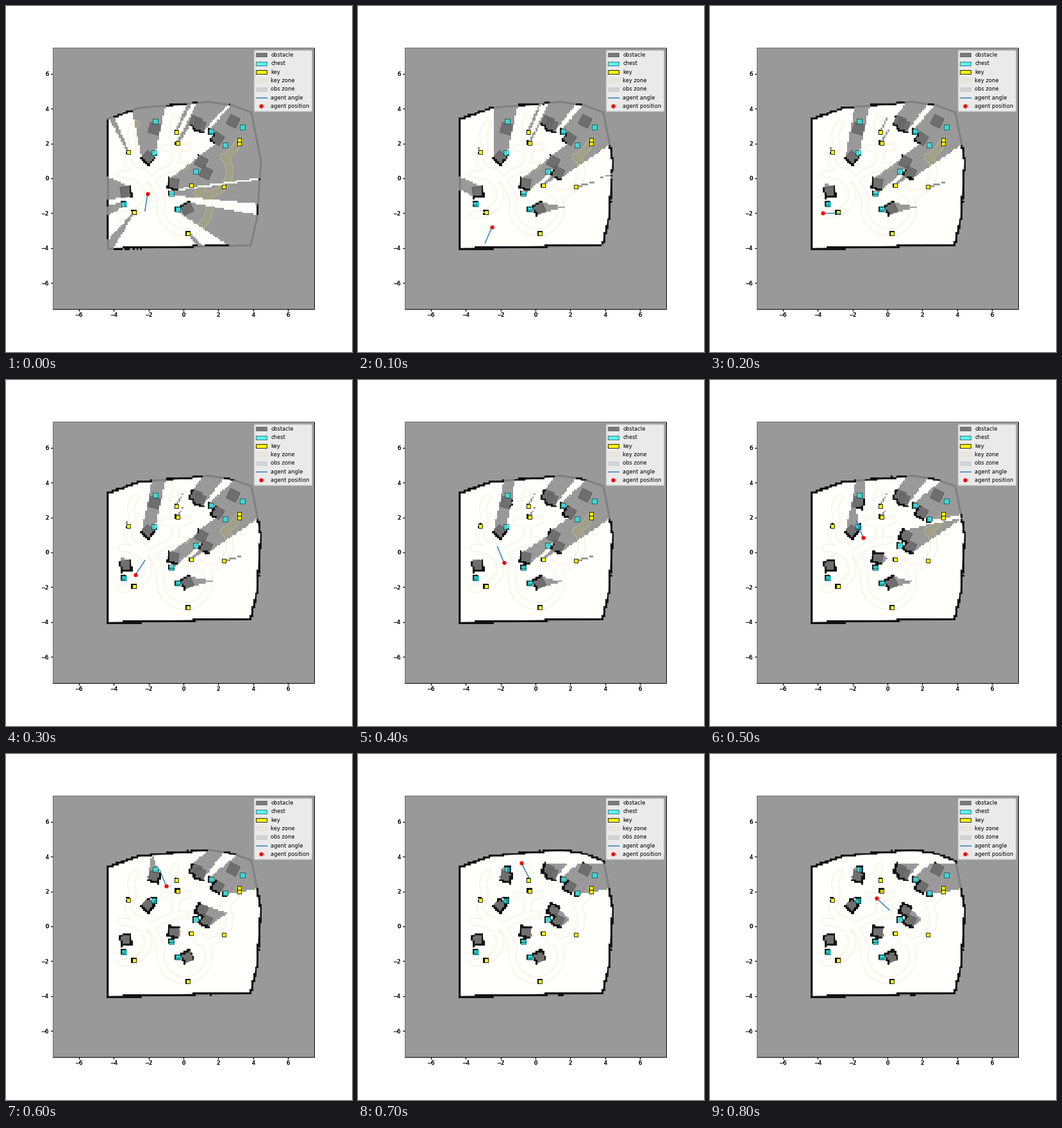
A matplotlib script that plays this animation: 540x540 px, repeating every 1100 ms.

```python
import numpy as np
import matplotlib.pyplot as plt
from matplotlib.animation import FuncAnimation
from matplotlib.lines import Line2D
from matplotlib.patches import Patch, Polygon
from matplotlib.path import Path

SIZE, DPI = 540, 100
LIM, CELL, FINE = 7.5, 0.1, 0.025
SCALE = 27.2                      # stage pixels per map unit
CX, CY = 277, 269                 # stage pixel of the map origin
BOX = [73 / SIZE, (SIZE - 473) / SIZE, 408 / SIZE, 408 / SIZE]
STEPS, LAST, SCANS = 11, 8, 4     # frames, last moving frame, scans per frame
FREE, HIT = (1, 1, 0.988), (0.07, 0.07, 0.07)


def to_map(points):
    p = np.asarray(points, float)
    return np.stack([(p[..., 0] - CX) / SCALE, (CY - p[..., 1]) / SCALE], -1)


def square(x, y, side, turn=0):
    """Corners of a square given in stage pixels, turned clockwise."""
    a = np.radians(turn + 45 + 90 * np.arange(4))
    r = side / np.sqrt(2)
    return to_map(np.stack([x + r * np.cos(a), y + r * np.sin(a)], -1))


def shrink(shape, factor):
    middle = shape.mean(0)
    return middle + (shape - middle) * factor


def arc(x, y, rx, ry, start, end):
    a = np.radians(np.linspace(start, end, 80))
    return to_map(np.stack([x + rx * np.cos(a), y + ry * np.sin(a)], -1))


def wave(p, q, swing, turns):
    """Line from p to q that sways sideways as a sine."""
    p, q = np.array(p, float), np.array(q, float)
    t = np.linspace(0, 1, 50)[:, None]
    side = np.array([p[1] - q[1], q[0] - p[0]]) / np.hypot(*(q - p))
    return to_map(p + t * (q - p) + swing * np.sin(2 * np.pi * turns * t) * side)


wall = to_map([(159, 379), (159, 176), (208, 159), (316, 149.5), (353, 155),
               (383, 166), (398, 242), (392, 330), (382, 373.5)])
obstacles = [square(x, y, 16.5, turn) for x, y, turn in [
    (231.5, 191.5, 15), (221.5, 237, 42), (187, 290, -8), (261, 277.5, 8),
    (282.5, 316, -25), (296, 181, 20), (302, 187, 18), (305, 243.5, 27),
    (312, 260.5, 25), (354.5, 180, 26), (330, 207, 32)]]
chests = [square(x, y, 8) for x, y in [
    (233, 180), (230.5, 228.5), (183.5, 308.5), (257.5, 292.5), (267.5, 316.5),
    (295.5, 257.5), (320, 195.5), (341.5, 216.5), (368.5, 188.5)]]
keys = [square(x, y, 6) for x, y in [
    (190.5, 227.5), (265.5, 196.5), (267.5, 213.5), (363.5, 208.5),
    (363.5, 214.5), (288.5, 280), (340, 282), (200, 321.5), (283.5, 354.5)]]
trails = np.vstack([
    arc(180, 294, 42, 32, -90, 90),                # loop on the left
    wave((203, 184), (190, 237), 4, 1),
    arc(212, 237, 22, 22, 90, 180),
    wave((212, 259), (242, 303), -5, 0.5),
    arc(279, 315, 38, 38, -50, 200),               # loop at the bottom
    arc(312, 258, 37, 36, -40, 110),               # bend on the right
    wave((340, 236), (363, 212), 3, 0.5),
    wave((264, 176), (262, 250), 3, 1),            # star in the middle
    wave((247, 221), (285, 219), 3, 0.5),
    wave((280, 250), (230, 268), 4, 0.5),
])

# frame, place in stage pixels, heading in degrees
stops = np.array([
    (0, 221, 293, -99), (1, 209, 345, -113), (2, 176, 323, 0),
    (4, 228, 285, 113), (6, 250, 206, 112), (7, 255, 170, -63),
    (8, 260, 225, -43)], float)


def pose(t):
    """Map place and heading in radians at frame time t."""
    x, y, turn = (np.interp(t, stops[:, 0], c) for c in stops.T[1:])
    return to_map((x, y)), np.radians(turn)


def solid_grid():
    n = int(2 * LIM / FINE)
    c = -LIM + FINE * (np.arange(n) + 0.5)
    pts = np.stack(np.meshgrid(c, c), -1).reshape(-1, 2)
    solid = ~Path(shrink(wall, 0.993)).contains_points(pts)
    for shape in obstacles + chests + [shrink(k, 0.8) for k in keys]:
        near = np.abs(pts - shape.mean(0)).max(1) < 0.7
        solid[near] |= Path(shape).contains_points(pts[near])
    return solid.reshape(n, n)


def index(v, step):
    return np.clip((v + LIM) / step, 0, 2 * LIM / step - 1).astype(int)


def scan_maps():
    """Cells known and cells hit at each frame, summed along the path."""
    solid = solid_grid()
    n = int(round(2 * LIM / CELL))
    known, hit = np.zeros((n, n), bool), np.zeros((n, n), bool)
    ang = np.linspace(0, 2 * np.pi, 1000, endpoint=False)[:, None]
    dist = np.arange(0, 10, 0.03)
    rays = np.arange(len(ang))
    maps = []
    for k in range(LAST * SCANS + 1):
        (x0, y0), _ = pose(k / SCANS)
        x, y = x0 + dist * np.cos(ang), y0 + dist * np.sin(ang)
        first = solid[index(y, FINE), index(x, FINE)].argmax(1)
        ix, iy = index(x, CELL), index(y, CELL)
        seen = np.arange(len(dist)) <= first[:, None]
        known[iy[seen], ix[seen]] = True
        hit[iy[rays, first], ix[rays, first]] = True
        if k % SCANS == 0:
            maps.append((known.copy(), hit.copy()))
    return maps


def layer(mask, color):
    img = np.zeros(mask.shape + (4,))
    img[..., :3] = color
    img[..., 3] = mask
    return img


maps = scan_maps()
fig = plt.figure(figsize=(SIZE / DPI, SIZE / DPI), dpi=DPI, facecolor="white")
# stacked axes make the tick labels look heavy
panels = [fig.add_axes(BOX, label=str(i)) for i in range(3)]
ax = panels[-1]
for p in panels:
    p.patch.set_visible(p is ax)
    p.set(xticks=range(-6, 7, 2), yticks=range(-6, 7, 2))
    p.tick_params(axis="x", labelsize=6, length=2.5, pad=1)
    p.tick_params(axis="y", labelsize=6, length=2.5, pad=2)
    p.spines[["left", "top"]].set_color("0.4")
    p.spines[:].set_linewidth(0.6)
ax.set_facecolor("0.6")

# key zone: everything close to the trails
g = np.linspace(-5, 5, 321)
gx, gy = np.meshgrid(g, g)
near = np.full(gx.shape, 9.0)
for x, y in trails:
    near = np.minimum(near, np.hypot(gx - x, gy - y))
ax.contourf(gx, gy, near, levels=[-1, 0.2], colors=["#a1a088"], zorder=1)
ax.contour(gx, gy, near, levels=[0.2], colors=["#d8d6b4"], linewidths=0.5,
           alpha=0.6, zorder=3)

grid_style = dict(extent=(-LIM, LIM, -LIM, LIM), origin="lower",
                  interpolation="nearest", aspect="auto")
free_img = ax.imshow(layer(maps[0][0], FREE), zorder=2, **grid_style)
hit_img = ax.imshow(layer(maps[0][1], HIT), zorder=6, **grid_style)

obstacle_style = dict(facecolor=(0.41, 0.41, 0.41, 0.87),
                      edgecolor=(0.33, 0.33, 0.33, 0.8), linewidth=0.6)
chest_style = dict(facecolor=(0, 1, 1, 0.6), edgecolor=(0, 0.15, 0.15, 0.7),
                   linewidth=0.6)
key_style = dict(facecolor="yellow", edgecolor="black", linewidth=0.6)
line_style = dict(color="C0", linewidth=1)
dot_style = dict(color="red", marker="o", linestyle="none", markersize=4.6,
                 markeredgewidth=0)

ax.add_patch(Polygon(wall, fill=False, edgecolor="0.5", linewidth=2.2,
                     joinstyle="round", zorder=4))
for z, shapes, style in [(5, obstacles, obstacle_style),
                         (7, chests, chest_style), (8, keys, key_style)]:
    for s in shapes:
        ax.add_patch(Polygon(s, zorder=z, **style))

pointer, = ax.plot([], [], zorder=9, **line_style)
agent, = ax.plot([], [], zorder=10, **dot_style)
mark, = ax.plot(*keys[2].mean(0), "o", color="#ff7f0e", markersize=2,
                markeredgewidth=0, zorder=10)

ax.legend(handles=[
    Patch(label="obstacle", **obstacle_style),
    Patch(label="chest", **chest_style),
    Patch(label="key", **key_style),
    Patch(label="key zone", facecolor="#e7e7db", edgecolor="#dedecb",
          linewidth=0.6),
    Patch(label="obs zone", facecolor="#d3d3d3", edgecolor="#cacaca",
          linewidth=0.6),
    Line2D([], [], label="agent angle", **line_style),
    Line2D([], [], label="agent position", **dot_style),
], loc="upper right", fontsize=6, labelspacing=0.52,
    borderpad=0.36).set_zorder(11)
for p in panels:
    p.set(xlim=(-LIM, LIM), ylim=(-LIM, LIM))


def draw(i):
    k = min(i, LAST)
    (x, y), turn = pose(k)
    pointer.set_data([x, x + np.cos(turn)], [y, y + np.sin(turn)])
    agent.set_data([x], [y])
    known, hit = maps[k]
    free_img.set_data(layer(known, FREE))
    hit_img.set_data(layer(hit, HIT))
    mark.set_visible(k == LAST)
    return free_img, hit_img, pointer, agent, mark


anim = FuncAnimation(fig, draw, frames=STEPS, interval=100, repeat=True,
                     repeat_delay=0, blit=False)
plt.show()
```
